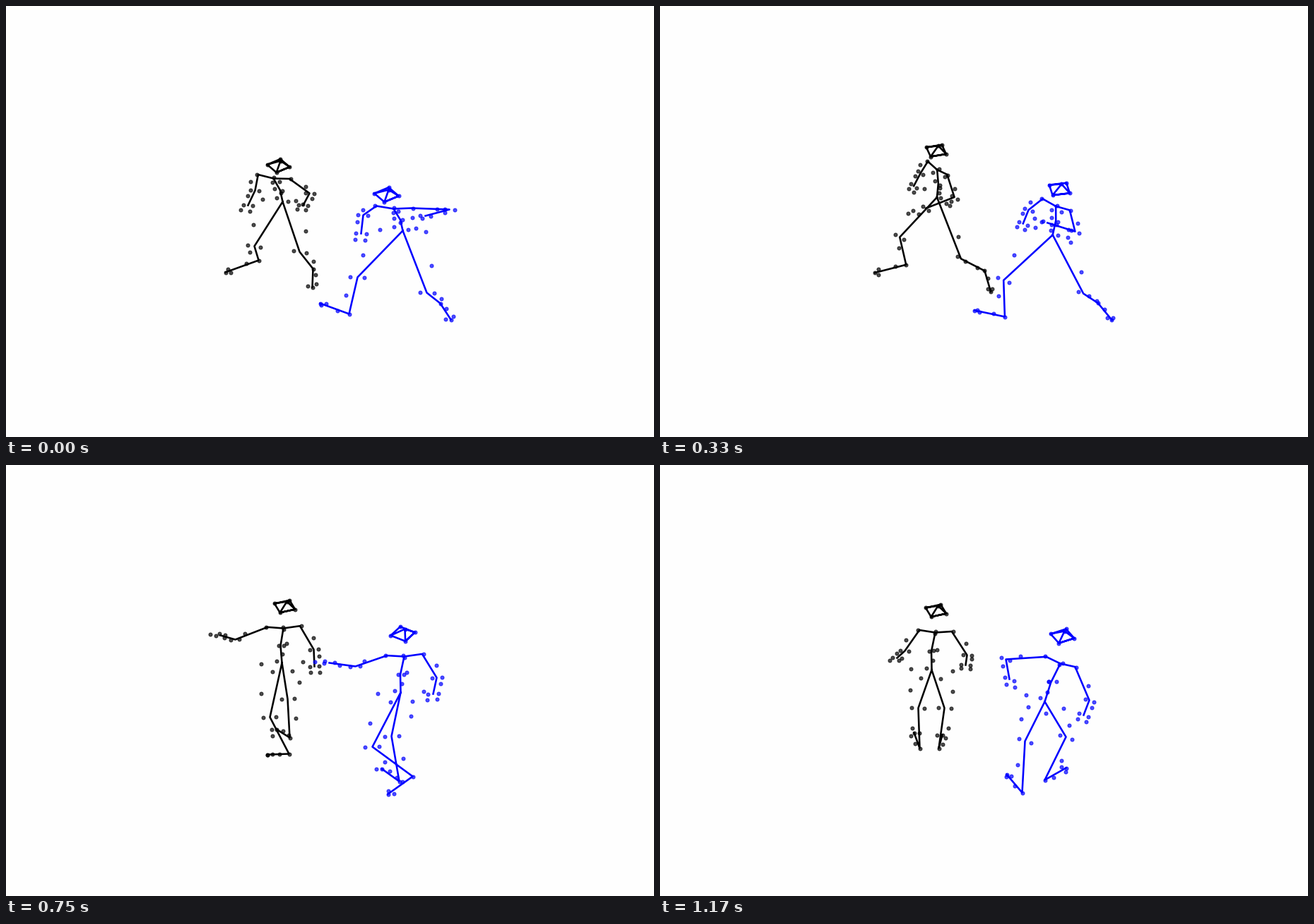
A matplotlib script that plays this animation: 917 px wide and 611 px high, repeating every 1200 ms.

```python
import numpy as np
import matplotlib.pyplot as plt
from matplotlib.animation import FuncAnimation

W, H, DPI = 917, 611, 100
FRAMES, STEP = 40, 30
KEYS = np.array([0, 210, 450, 600, 750, 990, 1170])  # key pose times, ms

LIMBS = {"arm": ["shoulder", "elbow", "hand"], "leg": ["hip", "knee", "ankle", "toe"]}

# Markers on limbs: segment, place along it, distance outward
LIMB_MARKERS = {
    "arm": [(0, 0, 2), (0, 0.5, 9), (0, 1, 7), (0, 1, -6), (1, 0.4, 7),
            (1, 1, 7), (1, 1, -7), (1, 1.35, 7), (1, 1.35, -6)],
    "leg": [(0, 0.55, 20), (0, 1, 10), (0, 1, -9), (1, 0.5, 10),
            (2, 0.3, 4), (2, 0.8, 6), (2, 0.98, -7)],
}
# Markers around the trunk: place from neck to hip, radius, angle in degrees
TRUNK_MARKERS = [(0, 3, 90), (0.05, 8, -90), (0.35, 14, 90), (0.45, 5, 0),
                 (0.5, 6, 180), (0.7, 5, 90), (0.95, 8, 180), (1, 30, 0),
                 (1, 30, 180), (1.1, 20, 45), (1.1, 20, 135)]


def glide(path, t):
    """Smooth cubic path through the key values."""
    path = np.asarray(path, float)
    i = min(np.searchsorted(KEYS, t, side="right") - 1, len(KEYS) - 2)
    h = KEYS[i + 1] - KEYS[i]
    u = (t - KEYS[i]) / h
    slope = np.gradient(path, KEYS, axis=0) * h
    return ((2*u**3 - 3*u**2 + 1) * path[i] + (u**3 - 2*u**2 + u) * slope[i]
            + (3*u**2 - 2*u**3) * path[i + 1] + (u**3 - u**2) * slope[i + 1])


def ring(angle, flat=0.5):
    """Point on a circle around the body, seen slightly from above."""
    a = np.radians(angle)
    return np.array([-np.cos(a), -flat * np.sin(a)])


def mix(p, q, f):
    return p + (q - p) * f


fig = plt.figure(figsize=(W / DPI, H / DPI), dpi=DPI, facecolor="#fefefe")
ax = fig.add_axes([0, 0, 1, 1])
ax.set(xlim=(0, W), ylim=(H, 0))
ax.axis("off")


class Runner:
    def __init__(self, color, size, yaw, tilt, **paths):
        self.size, self.yaw, self.tilt, self.paths = size, yaw, tilt, paths
        self.dots, = ax.plot([], [], "o", color=color, ms=3.6, mew=0.75, alpha=0.7)
        self.bones, = ax.plot([], [], color=color, lw=1.85, solid_joinstyle="round")

    def head(self, centre, t):
        tilt = glide(self.tilt, t)
        r = 0.7 * self.size
        left, top, right, chin = [centre + r * ring(tilt + a, 0.6)
                                  for a in (0, 90, 180, 270)]
        brow = centre + (3, -7)
        line = [left, top, right, chin, left, brow, chin, right, brow]
        return line, [left, top, right, chin, brow]

    def pose(self, t):
        yaw = glide(self.yaw, t)
        p = {name: glide(path, t) for name, path in self.paths.items()}
        neck, hip = p["neck"], p["hip"]
        scale = self.size / 23

        spine = mix(neck, hip, 0.5) + (3 * np.cos(np.radians(yaw)), 0)
        head_line, dots = self.head(p["head"], t)
        lines = [[neck, spine, hip], head_line]
        dots += [mix(neck, hip, f) + r * scale * ring(yaw + a)
                 for f, r, a in TRUNK_MARKERS]

        for side, turn in (("a", 0), ("b", 180)):
            out = ring(yaw + turn)
            p["shoulder_" + side] = neck + self.size * out + (0.5, -2.5)
            for limb, names in LIMBS.items():
                chain = [p.get(n + "_" + side, hip) for n in names]
                lines.append([neck] * (limb == "arm") + chain)
                dots += [mix(chain[i], chain[i + 1], f) + r * scale * out
                         for i, f, r in LIMB_MARKERS[limb]]
            dots += chain[2:]  # ankle and toe
        return lines, dots

    def draw(self, t):
        lines, dots = self.pose(t)
        gap = [(np.nan, np.nan)]
        self.bones.set_data(*(np.vstack([row for l in lines for row in (l, gap)]) - 0.5).T)
        self.dots.set_data(*(np.array(dots) - 0.5).T)
        return self.bones, self.dots


runners = [
    Runner(
        "black", 23,
        yaw=[15, 29, 85, 126, 176, 210, 185],
        tilt=[10, 10, 40, 5, 25, 45, 25],
        neck=[(379, 245), (390, 235), (394, 233), (396, 238), (393, 232), (399, 235), (390, 238)],
        hip=[(392, 278), (391, 268), (394, 277), (394, 278), (391, 281), (386, 287), (385, 291)],
        head=[(386, 227), (391, 207), (392, 208), (396, 211), (395, 201), (408, 203), (391, 207)],
        elbow_a=[(353, 262), (352, 246), (394, 234), (428, 243), (436, 262), (431, 288), (435, 270)],
        hand_a=[(343, 283), (344, 270), (381, 247), (408, 260), (437, 286), (432, 306), (433, 284)],
        elbow_b=[(430, 266), (431, 262), (393, 278), (349, 265), (325, 248), (355, 247), (347, 264)],
        hand_b=[(421, 283), (402, 286), (348, 280), (319, 246), (304, 242), (332, 265), (336, 274)],
        knee_a=[(352, 341), (346, 331), (339, 327), (357, 327), (399, 332), (406, 340), (403, 345)],
        ankle_a=[(358, 361), (348, 363), (357, 373), (382, 381), (402, 387), (394, 395), (395, 402)],
        toe_a=[(311, 378), (306, 380), (311, 377), (341, 377), (383, 375), (406, 379), (400, 383)],
        knee_b=[(416, 349), (428, 353), (418, 363), (397, 360), (374, 358), (360, 350), (366, 345)],
        ankle_b=[(435, 373), (451, 372), (462, 382), (445, 391), (401, 410), (345, 409), (368, 402)],
        toe_b=[(434, 399), (457, 400), (466, 411), (424, 414), (370, 411), (336, 402), (360, 380)]),
    Runner(
        "blue", 25,
        yaw=[7, 22, 67, 117, 175, 211, 215],
        tilt=[10, 20, 32, -25, -12, 15, 17],
        neck=[(549, 288), (559, 283), (560, 285), (557, 279), (564, 272), (570, 274), (567, 282)],
        hip=[(562, 319), (554, 322), (559, 327), (557, 325), (559, 323), (554, 328), (545, 336)],
        head=[(539, 268), (565, 262), (562, 257), (559, 249), (562, 240), (570, 236), (570, 243)],
        elbow_a=[(506, 297), (511, 290), (542, 290), (584, 289), (610, 302), (615, 323), (608, 334)],
        hand_a=[(503, 323), (501, 316), (537, 304), (577, 308), (605, 325), (609, 346), (600, 355)],
        elbow_b=[(628, 289), (634, 307), (535, 323), (503, 294), (495, 286), (494, 278), (490, 276)],
        hand_b=[(594, 298), (598, 306), (493, 302), (460, 275), (458, 281), (488, 306), (495, 304)],
        knee_a=[(498, 385), (488, 391), (493, 387), (518, 388), (546, 385), (564, 389), (575, 386)],
        ankle_a=[(486, 437), (474, 440), (512, 442), (545, 444), (557, 449), (535, 448), (545, 447)],
        toe_a=[(445, 422), (430, 432), (471, 431), (504, 433), (532, 431), (565, 432), (575, 430)],
        knee_b=[(596, 407), (591, 411), (600, 407), (564, 416), (519, 400), (516, 383), (517, 392)],
        ankle_b=[(615, 422), (602, 424), (635, 422), (615, 434), (576, 442), (510, 453), (513, 465)],
        toe_b=[(630, 445), (617, 446), (655, 449), (618, 465), (541, 467), (485, 437), (491, 439)]),
]


def update(n):
    return [artist for r in runners for artist in r.draw(n * STEP)]


anim = FuncAnimation(fig, update, frames=FRAMES, interval=STEP, repeat=True,
                     repeat_delay=0, blit=False)
plt.show()
```
